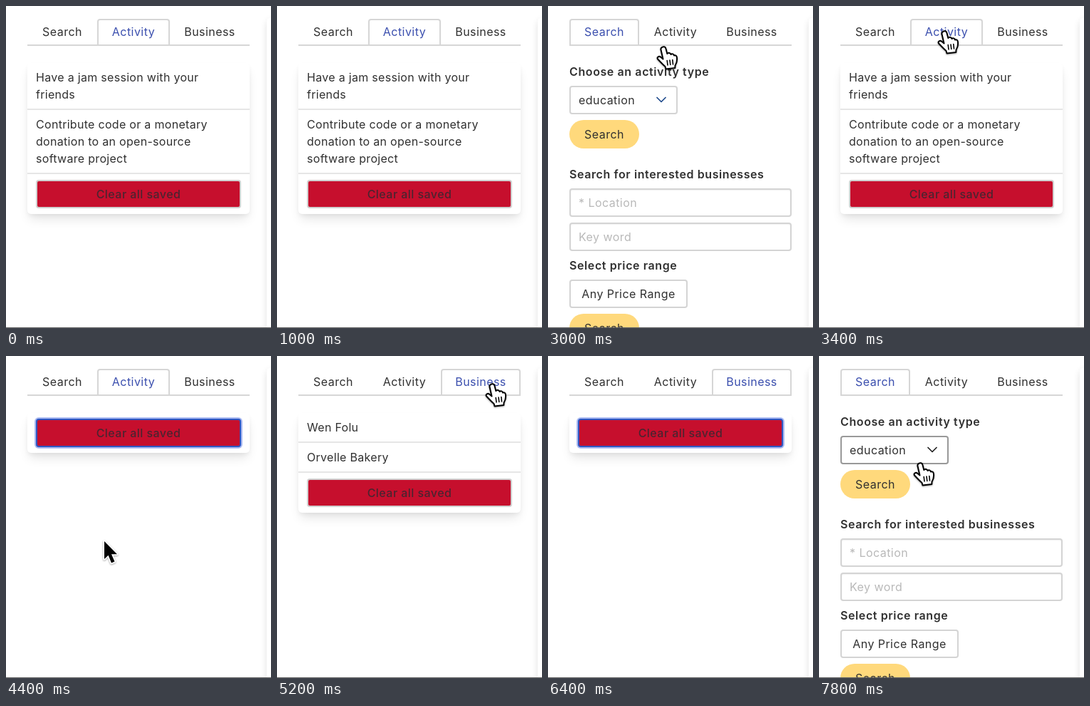
An HTML page that plays this animation: 372 px wide and 452 px high, repeating every 8000 ms.

```html
<!DOCTYPE html>
<html lang="en">
<head>
<meta charset="utf-8">
<title>Saved activities</title>
<style>
* { box-sizing: border-box; margin: 0; padding: 0; }
html, body { width: 100%; height: 100%; overflow: hidden; background: #fff; }
body { position: relative; font: 16px/24px Inter, "Open Sans", sans-serif; letter-spacing: .45px; color: #303030; white-space: nowrap; }

.side { position: absolute; left: 366px; top: 16px; width: 60px; height: 500px; border-radius: 6px; background: #fff; box-shadow: 0 4px 10px rgba(0, 0, 0, .12); }
.edge { position: absolute; left: 0; right: 0; top: 451px; height: 1px; background: #666; }

nav { position: absolute; left: 30px; top: 18px; width: 312px; height: 38px; display: flex; border-bottom: 2px solid #d6d6d6; }
nav b { height: 36px; border: 2px solid transparent; border-bottom: 0; border-radius: 4px 4px 0 0; font-weight: 400; line-height: 33px; text-align: center; }
nav b:nth-child(1) { width: 98px; }
nav b:nth-child(2) { width: 102px; }
nav b:nth-child(3) { width: 112px; }
.search nav b:nth-child(1), .activity nav b:nth-child(2), .business nav b:nth-child(3) { color: #3b4fae; border-color: #d6d6d6; }

section { position: absolute; left: 30px; top: 80px; width: 312px; display: none; }
.search #search, .activity #activity, .business #business { display: block; }

.card { border-radius: 5px; background: #fff; box-shadow: 0 10px 15px -3px rgba(0, 0, 0, .1), 0 3px 6px -1px rgba(0, 0, 0, .06); }
li { list-style: none; padding: 8px 12px; border-bottom: 2px solid #e6e6e6; letter-spacing: .3px; }
.clear { padding: 8px 12px; }
.clear p { height: 40px; border: 2px solid #d0d0d0; border-radius: 4px; background: #c60f2d; color: #4b2430; font-weight: 500; line-height: 36px; text-align: center; }
.cleared li { display: none; }
.cleared .clear p { border-color: #2f55c0; box-shadow: 0 0 0 2px #adbdf3; }

h2 { font-size: 16px; font-weight: 600; letter-spacing: .6px; margin-bottom: 8px; }
.box, .pill { height: 40px; margin-bottom: 8px; line-height: 36px; }
.box { border: 2px solid #d4d4d4; border-radius: 4px; padding-left: 11px; }
.input { color: #b9b9b9; box-shadow: inset 0 1px 2px rgba(0, 0, 0, .06); }
.pill { width: 98px; border-radius: 20px; background: #ffd97c; line-height: 40px; text-align: center; }
.select { position: relative; width: 152px; }
.select svg { position: absolute; left: 119px; top: 12px; fill: none; stroke: #1f4a8c; stroke-width: 1.7; stroke-linecap: round; stroke-linejoin: round; }
.hover .select { border-color: #999; }
.hover .select svg { stroke: #222; }
.price { width: 166px; padding: 0; text-align: center; }

.cursor { position: absolute; left: 0; top: 0; overflow: visible; display: none; filter: drop-shadow(0 1px 1px rgba(0, 0, 0, .35)); stroke-linejoin: round; stroke-linecap: round; }
#hand { fill: #fff; stroke: #000; stroke-width: 2; }
#arrow { fill: #000; stroke: #fff; stroke-width: 3.4; paint-order: stroke; }
</style>
</head>
<body>
<div class="side"></div>
<main id="app">
  <nav><b>Search</b><b>Activity</b><b>Business</b></nav>

  <section id="search">
    <h2>Choose an activity type</h2>
    <div class="box select">education
      <svg width="16" height="12"><path d="M2 2.5 8 8.5 14 2.5"/></svg>
    </div>
    <div class="pill" style="margin-bottom:24px">Search</div>
    <h2>Search for interested businesses</h2>
    <div class="box input">* Location</div>
    <div class="box input">Key word</div>
    <h2>Select price range</h2>
    <div class="box price">Any Price Range</div>
    <div class="pill">Search</div>
  </section>

  <section id="activity" class="card">
    <ul>
      <li>Have a jam session with your<br>friends</li>
      <li>Contribute code or a monetary<br>donation to an open-source<br>software project</li>
    </ul>
    <div class="clear"><p>Clear all saved</p></div>
  </section>

  <section id="business" class="card">
    <ul>
      <li>Wen Folu</li>
      <li>Orvelle Bakery</li>
    </ul>
    <div class="clear"><p>Clear all saved</p></div>
  </section>
</main>
<div class="edge"></div>

<svg id="hand" class="cursor" width="31" height="34">
  <path d="M8 2C10 .5 13 1 13.5 4L15.3 11C17 9 20 9.8 20.5 12 22 10.5 24.5 11.3 25 13.5 27 12.5 29 14 29 17 29.5 23 28 25 26.5 27.5L26.3 31 13.5 32.5 12.5 29C9 26 5 21.5 2 18.5 .5 15.5 4 13.8 6.2 15.8L9.5 18.5 6.5 5.5C6.1 3.8 7 2.5 8 2Z"/>
  <path d="M15.2 20.5 16 27M19 20 19.8 26.5M22.8 19.5 23.5 26" stroke-width="1.6"/>
</svg>
<svg id="arrow" class="cursor" width="20" height="32">
  <path d="M0 0V25L5.6 19.8 10 30.5 14.5 28.6 10 18.3H18Z"/>
</svg>

<script>
const LOOP = 8000;
// [start ms, view state, cursor, x, y]
const steps = [
  [0, "activity"],
  [600, "activity", "hand", 168, 40],
  [800, "activity", "arrow", 328, 87],
  [1000, "activity"],
  [2200, "search"],
  [2400, "search hover", "hand", 132, 146],
  [2800, "search", "hand", 138, 92],
  [3000, "search", "hand", 152, 56],
  [3200, "search", "hand", 164, 38],
  [3400, "activity", "hand", 166, 34],
  [4000, "activity", "hand", 130, 260],
  [4200, "activity cleared", "arrow", 139, 258],
  [4400, "activity cleared", "arrow", 138, 260],
  [4800, "activity cleared", "arrow", 222, 142],
  [5000, "activity cleared", "hand", 284, 50],
  [5200, "business", "hand", 292, 38],
  [6000, "business cleared", "arrow", 197, 187],
  [6400, "business cleared"],
  [7600, "search", "hand", 72, 36],
  [7800, "search hover", "hand", 132, 149]
];
const app = document.getElementById("app");
const cursors = document.querySelectorAll(".cursor");

function draw(now) {
  const t = now % LOOP;
  const [, view, cursor, x, y] = steps.findLast(step => step[0] <= t);
  app.className = view;
  for (const el of cursors) {
    el.style.display = el.id === cursor ? "block" : "none";
    el.style.transform = `translate(${x || 0}px, ${y || 0}px)`;
  }
}

const start = performance.now();
function tick() {
  draw(performance.now() - start);
  requestAnimationFrame(tick);
}
tick();
</script>
</body>
</html>
```
